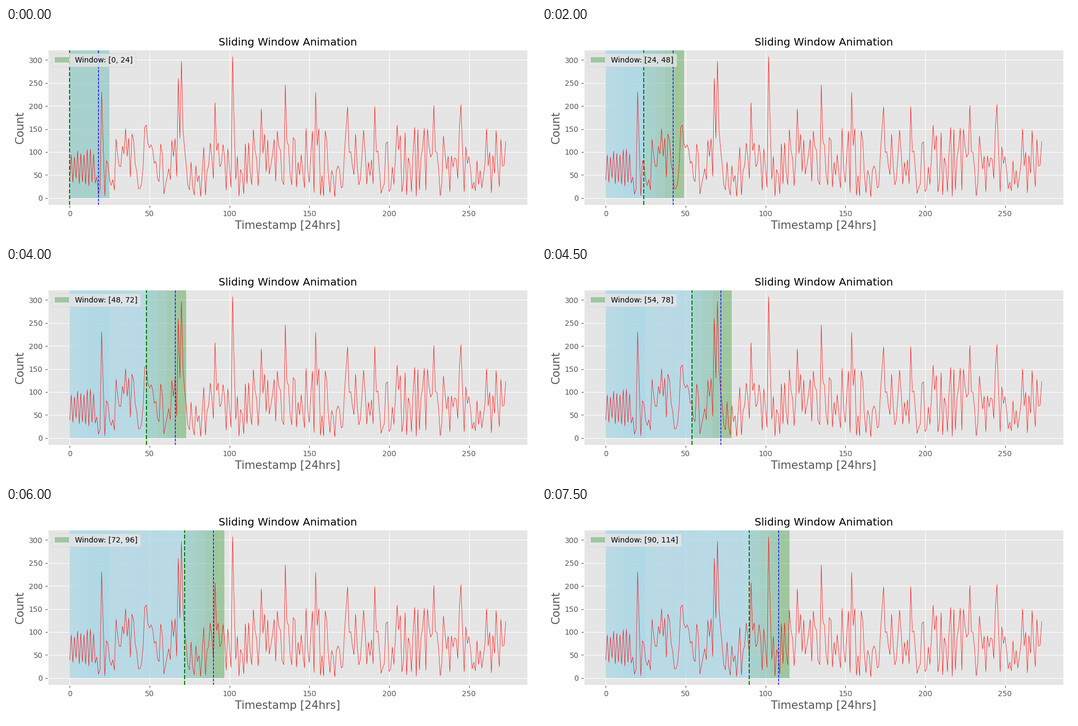
A matplotlib script for the animation above (8000 ms loop, 1000 by 400 pixels).

```python
import numpy as np
import matplotlib.pyplot as plt
from matplotlib.animation import FuncAnimation
from matplotlib.patches import Rectangle

SPAN, STEP, STEPS = 24, 6, 16
MARK = 18           # offset of the blue marker inside the window
FIRST_LAYERS = 3    # trail layers already lying on the first window
SAMPLES = 274

# The few spikes that rise above the noise.
SPIKES = {20: 230, 68: 260, 70: 297, 91: 207, 102: 307, 120: 194, 135: 246,
          154: 229, 174: 198, 191: 199, 228: 201, 245: 203}


def make_counts():
    rng = np.random.default_rng(5)
    x = np.arange(SAMPLES)
    y = 160 * rng.beta(1.1, 1.3, SAMPLES)
    # regular zigzag at the start
    y[:17] = 65 - 32 * (-1.0) ** x[:17] + rng.uniform(-10, 10, 17)
    for i, peak in SPIKES.items():
        y[i:i + 2] = peak, peak / 2
    return x, y


plt.style.use("ggplot")
fig, ax = plt.subplots(figsize=(10, 4), dpi=100)
fig.subplots_adjust(left=0.079, right=0.984, bottom=0.165, top=0.8975)
ax.plot(*make_counts(), color="red", lw=0.5)
ax.set_xlim(-13.65, 286.65)
ax.set_ylim(-15.35, 322.35)
ax.set_title("Sliding Window Animation")
ax.set_xlabel("Timestamp [24hrs]", fontsize=15)
ax.set_ylabel("Count", fontsize=15)


def add_band(start, color, **kw):
    band = Rectangle((start, 0), SPAN + 1, 400, facecolor=color,
                     alpha=0.3, lw=0, **kw)
    return ax.add_patch(band)


window = add_band(0, "green", label=f"Window: [0, {SPAN}]")
for _ in range(FIRST_LAYERS):
    add_band(0, "lightblue")
trail = [add_band(STEP * i, "lightblue") for i in range(STEPS - 1)]
start_line = ax.axvline(0, color="green", ls="--", lw=1.5)
mark_line = ax.axvline(MARK, color="blue", ls="--", lw=1)
label = ax.legend(loc="upper left").get_texts()[0]


def update(n):
    start = STEP * n
    window.set_x(start)
    start_line.set_xdata([start, start])
    mark_line.set_xdata([start + MARK, start + MARK])
    for i, band in enumerate(trail):
        band.set_visible(i < n)
    label.set_text(f"Window: [{start}, {start + SPAN}]")
    return [window, start_line, mark_line, label, *trail]


anim = FuncAnimation(fig, update, frames=STEPS, interval=500, repeat=True)
plt.show()
```
